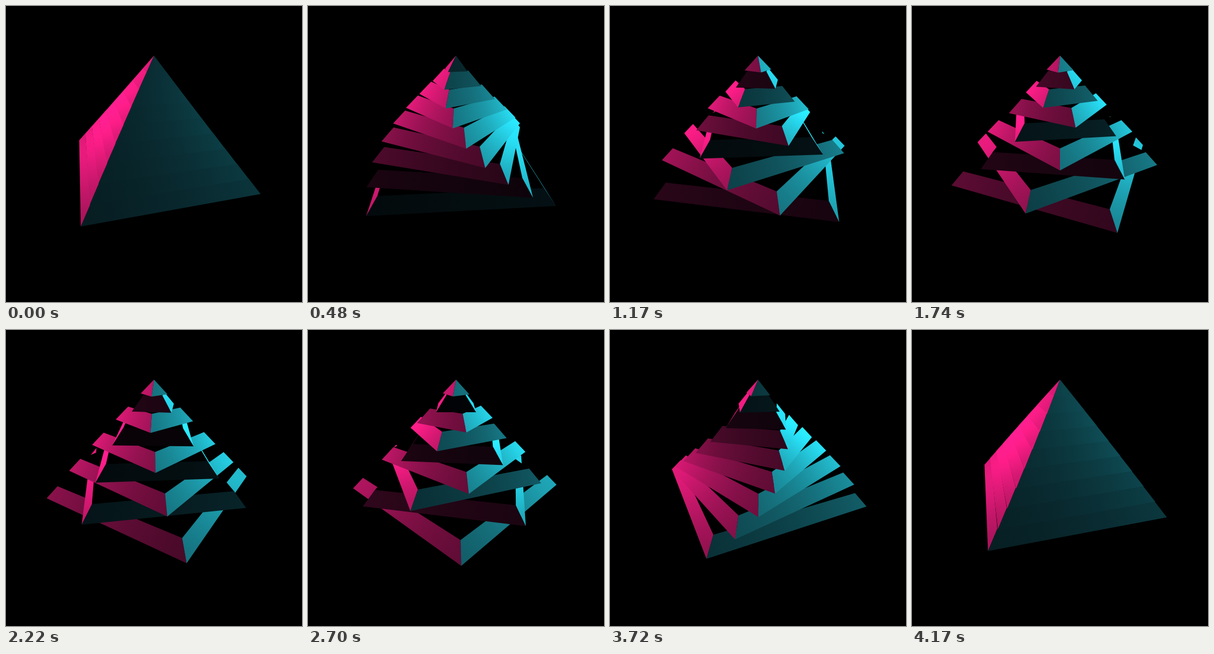
These frames come from a looping animation (540 by 540 pixels, 4200 ms). An HTML page with a canvas:

```html
<!DOCTYPE html>
<html lang="en">
<head>
<meta charset="utf-8">
<title>Twisting pyramid</title>
<style>
html, body { margin: 0; width: 100%; height: 100%; overflow: hidden; background: #000; }
canvas { display: block; }
</style>
</head>
<body>
<canvas id="stage" width="540" height="540"></canvas>
<script>
const ctx = document.getElementById('stage').getContext('2d');
const LOOP = 4200, STEP = 30, SLICES = 9, QUARTER = Math.PI / 2;
const START = -Math.PI / 6;
const LIGHT_X = 1.1;
const PINK = [222, 24, 116], CYAN = [34, 196, 214], AMBIENT = [2, 2, 4];

// u runs from 0 at the apex to 1 at the base; x and z are horizontal.
function project({ x, z, u }) {
  const depth = 1 - 0.3483 * z - 0.1883 * (1 - u);
  return [270 + 185.6 * x / depth,
          270 + (15.5 + 89 * z - 161.2 * (1 - u)) / depth];
}

const corner = (angle, u) => ({ x: u * Math.sin(angle), z: u * Math.cos(angle), u });

const mix = (a, b, t) => ({
  x: a.x + (b.x - a.x) * t, z: a.z + (b.z - a.z) * t, u: a.u
});

function fillPolygon(points, style) {
  ctx.beginPath();
  points.forEach(p => ctx.lineTo(p[0], p[1]));
  ctx.closePath();
  ctx.fillStyle = style;
  ctx.fill();
}

// One point light on each side, level with the apex.
function shade(p, facing) {
  const side = Math.sign(facing) || 1;
  const distance = Math.hypot(side * LIGHT_X - p.x, p.u, p.z);
  const level = Math.abs(facing) * LIGHT_X / distance;
  const tint = side < 0 ? PINK : CYAN;
  return `rgb(${tint.map((c, i) => Math.min(255, Math.round(c * level + AMBIENT[i])))})`;
}

function drawFace(angle, top, bottom) {
  const next = angle + QUARTER;
  const overlap = Math.max(0, top - 0.003);  // hides the seam to the slice above
  const quad = [corner(angle, overlap), corner(next, overlap),
                corner(next, bottom), corner(angle, bottom)].map(project);
  const [a, b, c, d] = quad;
  const area = (c[0] - a[0]) * (d[1] - b[1]) - (c[1] - a[1]) * (d[0] - b[0]);
  if (area <= 0) return;

  const middle = (top + bottom) / 2;
  const from = corner(angle, middle), to = corner(next, middle);
  const p = project(from), q = project(to);
  const dx = q[0] - p[0], dy = q[1] - p[1], length2 = dx * dx + dy * dy;
  const gradient = ctx.createLinearGradient(...p, ...q);
  const facing = Math.sin(angle + QUARTER / 2);
  for (let i = 0; i <= 8; i++) {
    const point = mix(from, to, i / 8), s = project(point);
    const offset = ((s[0] - p[0]) * dx + (s[1] - p[1]) * dy) / length2;
    gradient.addColorStop(Math.min(1, Math.max(0, offset)), shade(point, facing));
  }
  fillPolygon(quad, gradient);
}

function draw(time) {
  ctx.fillStyle = '#000';
  ctx.fillRect(0, 0, 540, 540);
  // Each slice makes one more quarter turn per loop than the slice below it.
  const turn = QUARTER * time / LOOP;
  for (let n = SLICES; n > 0; n--) {
    const angle = START - (SLICES + 1 - n) * turn;
    const angles = [0, 1, 2, 3].map(i => angle + i * QUARTER);
    const top = (n - 1) / SLICES, bottom = n / SLICES;
    fillPolygon(angles.map(a => project(corner(a, top))), '#000');
    angles.forEach(a => drawFace(a, top, bottom));
  }
}

const begin = performance.now();
function tick() {
  const elapsed = (performance.now() - begin) % LOOP;
  draw(Math.floor(elapsed / STEP) * STEP + 10);
  requestAnimationFrame(tick);
}
tick();
</script>
</body>
</html>
```
